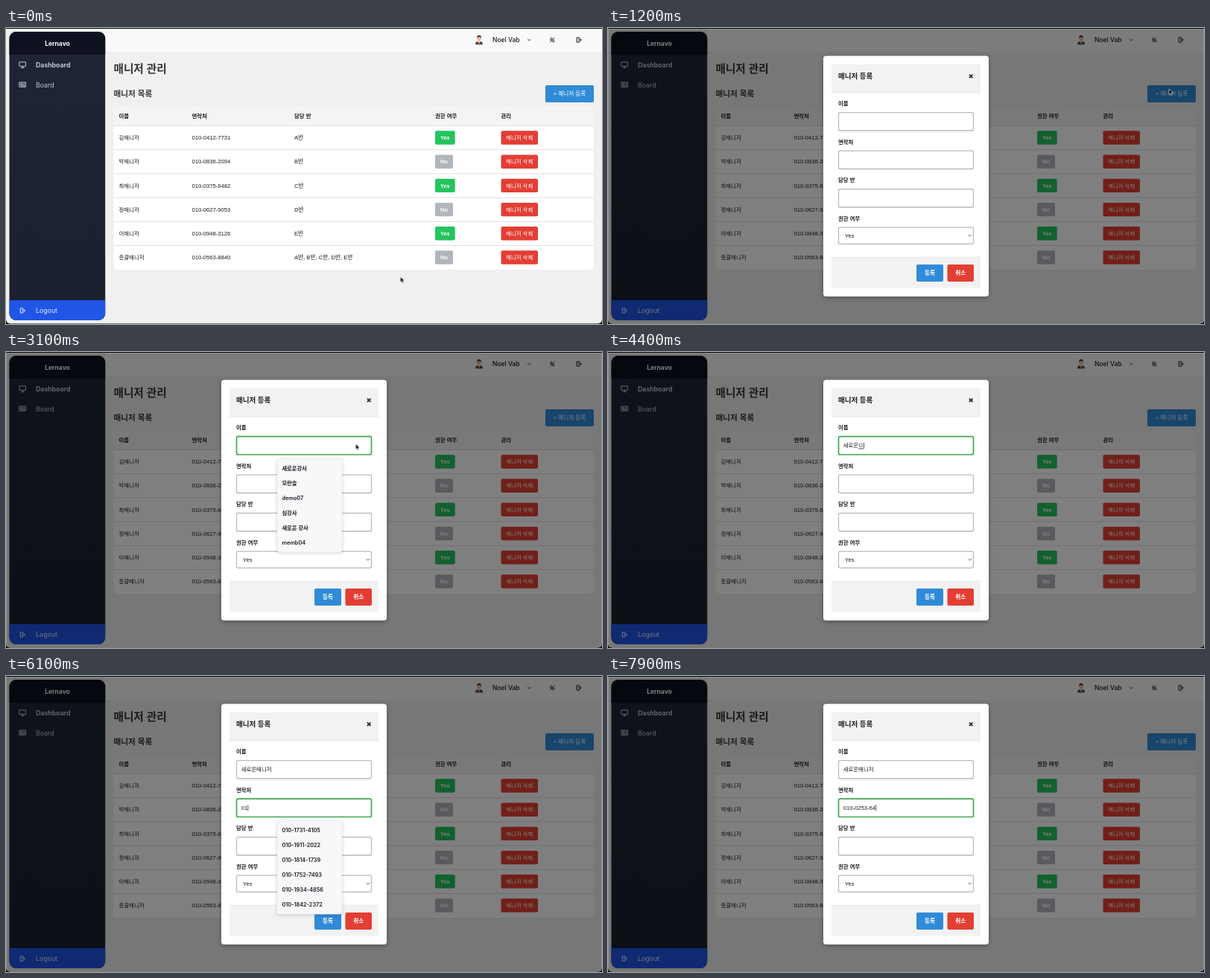
Write an HTML page that moves like this. It is 800x398 px and loops after 8 s.

```html
<!DOCTYPE html>
<html lang="ko">
<head>
<meta charset="utf-8">
<title>매니저 관리</title>
<style>
  html, body { margin: 0; width: 100%; height: 100%; overflow: hidden; background: #000; }
  svg { display: block; width: 800px; height: 398px; }
  text { font: 7.4px "Liberation Sans", "Noto Sans CJK KR", "Noto Sans CJK", sans-serif; fill: #1b1b1f; white-space: pre; }
  .ui { font-family: Inter, "Noto Sans CJK KR", "Noto Sans CJK", sans-serif; font-size: 8.5px; }
  .nav { font-size: 8.8px; }
  .num { font-size: 7.65px; }
  .tip { font-size: 7.3px; font-weight: 600; }
  .b { font-weight: 700; }
  .m { font-weight: 500; }
  .w { fill: #fff; }
  .mid { text-anchor: middle; }
  .line { fill: none; stroke-linecap: round; stroke-linejoin: round; }
  .field { fill: #fff; stroke: #b9b9b9; stroke-width: 1.3; }
  .field.on { stroke: #3fa854; stroke-width: 1.7; }

  #modal { animation: open 8s step-end infinite; }
  #add { animation: hover 8s step-end infinite; }
  #pointer { animation: travel 8s infinite, hide 8s step-end infinite; }
  @keyframes open { 0% { visibility: hidden; } 14.5%, 100% { visibility: visible; } }
  @keyframes hover { 0% { fill: #2f8bd8; } 11.5% { fill: #3f70b0; } 14.5%, 100% { fill: #2f8bd8; } }
  @keyframes hide { 0% { visibility: visible; } 43.5%, 100% { visibility: hidden; } }
  @keyframes travel {
    0%, 2.5% { transform: translate(529.5px, 334.5px); animation-timing-function: ease-in-out; }
    12.5%, 18.5% { transform: translate(753px, 82px); animation-timing-function: ease-in-out; }
    34.5%, 100% { transform: translate(469.5px, 123.5px); }
  }
</style>
</head>
<body>
<svg viewBox="0 0 800 398" xmlns="http://www.w3.org/2000/svg">
  <defs>
    <clipPath id="window"><path id="edge" d="M0 1H800V391Q800 397.5 794 397.5H6Q0 397.5 0 391Z"/></clipPath>
    <clipPath id="side"><rect x="4.5" y="5" width="128.7" height="388" rx="9"/></clipPath>
    <clipPath id="card"><rect x="144.5" y="106" width="644.5" height="219" rx="5"/></clipPath>
    <linearGradient id="navy" x2="0" y2="1">
      <stop stop-color="#1e2536"/><stop offset="1" stop-color="#1a202e"/>
    </linearGradient>
    <filter id="soft" x="-20%" y="-20%" width="140%" height="140%">
      <feDropShadow dx="0" dy="2" stdDeviation="3" flood-opacity=".3"/>
    </filter>
    <filter id="faint" x="-20%" y="-20%" width="140%" height="140%">
      <feDropShadow dx="0" dy="1" stdDeviation="2" flood-opacity=".2"/>
    </filter>
    <path id="exit" class="line" stroke-width="1" d="M.8 -1.8V-3.1H-2.7V3.1H.8V1.8M-.6 0H3.3M2 -1.3L3.3 0L2 1.3"/>
  </defs>

  <g clip-path="url(#window)">
    <rect width="800" height="398" fill="#f0f0f0"/>
    <rect x="133" width="667" height="32" fill="#f9f9fc"/>

    <g clip-path="url(#side)">
      <rect x="4" y="5" width="130" height="388" fill="url(#navy)"/>
      <rect x="4" y="5" width="130" height="31" fill="#0d1120"/>
      <rect x="4" y="366" width="130" height="28" fill="#2055e6"/>
    </g>
    <text class="ui b w mid" x="69" y="23.8">Lernavo</text>
    <text class="ui nav" x="40" y="52.8" style="fill:#d3d8e0;font-weight:600">Dashboard</text>
    <text class="ui nav" x="40" y="79.6" style="fill:#c0c6d0">Board</text>
    <text class="ui nav" x="40" y="383.2" style="fill:#e8eeff">Logout</text>
    <g class="line" stroke="#d3d8e0" stroke-width=".9">
      <path d="M18.2 45.8H26.4V51.4H18.2ZM22.3 51.4V53.4M20.4 53.5H24.2"/>
      <path d="M18.2 73H26.4V79.2H18.2ZM20 74.8H22V76.6H20ZM23.6 74.8H25M23.6 76.6H25M20 78H25"/>
    </g>
    <use href="#exit" x="22" y="380" stroke="#e8eeff"/>

    <g>
      <path d="M630 22.3Q630 18.4 633 18H637Q640 18.4 640 22.3Z" fill="#454b58"/>
      <path d="M633.2 17.5H636.8L635 22.3Z" fill="#fff"/>
      <path d="M634.5 18.8H635.5L636 22.3H634Z" fill="#d8423c"/>
      <ellipse cx="635" cy="14.3" rx="2.5" ry="3.6" fill="#f0bd98"/>
      <path d="M632.2 14Q632 9.8 635 9.8Q638.3 9.8 637.8 14Q637.2 12 635 12Q632.8 12 632.2 14Z" fill="#4a2c24"/>
    </g>
    <text class="ui m" x="653" y="19.3">Noel Vab</text>
    <g class="line" stroke="#222" stroke-width=".95">
      <path d="M700.6 15.3L702.3 16.9L704 15.3"/>
      <path d="M730.4 19.1L736 13M730.3 14.6L731.3 15M732 12.8L732.4 13.8M735.2 17.6L736.3 18M734.2 18.2V19.2"/>
      <path d="M731.2 16.7A2 2 0 0 1 733 14.4M733.3 17.6A2 2 0 0 0 735.2 15.6"/>
    </g>
    <use href="#exit" x="768.8" y="16" stroke="#111"/>

    <text class="b" x="144.5" y="59.5" style="font-size:14.6px;fill:#333">매니저 관리</text>
    <text class="b" x="144.5" y="92.3" style="font-size:10.6px;fill:#333">매니저 목록</text>
    <rect id="add" x="724" y="77" width="65" height="23" rx="2" fill="#2f8bd8"/>
    <text class="m w mid" x="756.5" y="91.2" style="font-size:7.6px">+ 매니저 등록</text>

    <g clip-path="url(#card)">
      <rect x="144" y="106" width="645" height="219" fill="#fff"/>
      <rect x="144" y="106" width="645" height="25.5" fill="#f4f4f4"/>
    </g>
    <g id="table"></g>
  </g>

  <g id="modal">
    <rect y="1" width="800" height="397" fill="#000" fill-opacity=".5" clip-path="url(#window)"/>
    <use href="#edge" fill="none" stroke="#fff" stroke-opacity=".4" clip-path="url(#window)"/>
    <rect x="289" y="37.5" width="222" height="323.5" rx="4" fill="#fff" filter="url(#soft)"/>
    <rect x="300" y="48.5" width="200" height="38.5" fill="#f2f2f2"/>
    <rect x="300" y="308.5" width="200" height="41" fill="#f2f2f2"/>
    <path d="M300 87H500M300 308.3H500" stroke="#e0e0e0" stroke-width=".8"/>
    <text class="b" x="309" y="68" style="font-size:9.5px">매니저 등록</text>
    <path d="M484.9 62.6L489.5 67.2M489.5 62.6L484.9 67.2" stroke="#2b2b2b" stroke-width="1.8"/>
    <g id="form"></g>
    <text class="num" x="318" y="281.9">Yes</text>
    <path class="line" d="M484 278.2L486 280.2L488 278.2" stroke="#555" stroke-width=".9"/>
    <rect x="414" y="318" width="36" height="23" rx="2" fill="#2f8bd8"/>
    <rect x="455.5" y="318" width="35.5" height="23" rx="2" fill="#e33e33"/>
    <text class="b w mid" x="432" y="332.2" style="font-size:7.6px">등록</text>
    <text class="b w mid" x="473.3" y="332.2" style="font-size:7.6px">취소</text>
    <g id="values"></g>
    <g id="tips"></g>
  </g>

  <path id="pointer" d="M0 0V7.4L1.7 5.9L2.9 8.6L4.2 8L3 5.4H5.3Z" fill="#000" stroke="#fff" stroke-width=".6"/>
</svg>

<script>
const NS = 'http://www.w3.org/2000/svg';
const $ = id => document.getElementById(id);

function add(parent, tag, attrs, content = '') {
  const el = document.createElementNS(NS, tag);
  for (const key in attrs) el.setAttribute(key, attrs[key]);
  el.textContent = content;
  return parent.appendChild(el);
}
const label = (parent, x, y, content, cls = '') => add(parent, 'text', { x, y, class: cls }, content);
const box = (parent, x, y, width, height, fill, rx = 2) =>
  add(parent, 'rect', { x, y, width, height, fill, rx });

// Table
const table = $('table');
const columns = [151.5, 249.5, 387, 576, 664.5];
['이름', '연락처', '담당 반', '권한 여부', '관리'].forEach((s, i) => label(table, columns[i], 121.2, s, 'b'));

[
  ['김매니저', '010-0412-7731', 'A반'],
  ['박매니저', '010-0836-2094', 'B반'],
  ['최매니저', '010-0375-6482', 'C반'],
  ['정매니저', '010-0627-9053', 'D반'],
  ['이매니저', '010-0948-3126', 'E반'],
  ['총괄매니저', '010-0563-8840', 'A반, B반, C반, D반, E반']
].forEach((row, i) => {
  const y = 147.5 + i * 32.2;
  add(table, 'path', { d: `M144.5 ${y - 16}H789`, stroke: '#dcdcdc', 'stroke-width': .9 });
  row.forEach((s, c) => label(table, columns[c], y + 2.7, s, c ? 'num' : ''));
  const yes = i % 2 === 0;
  box(table, 576, y - 9.2, yes ? 26.7 : 24, 18.4, yes ? '#25c45f' : '#b1b6bd');
  label(table, yes ? 589.3 : 588, y + 2.7, yes ? 'Yes' : 'No', 'b w mid');
  box(table, 664.5, y - 9.2, 49.5, 18.4, '#e33e33');
  label(table, 689.2, y + 2.7, '매니저 삭제', 'm w mid');
});

// Form
const fields = ['이름', '연락처', '담당 반', '권한 여부'].map((s, i) => {
  const y = 113.6 + i * 51.5;
  label($('form'), 309, y - 9.2, s, 'b');
  return add($('form'), 'rect', { x: 309.5, y, width: 181, height: i < 3 ? 24.4 : 22.2, rx: 2, class: 'field' });
});

const INPUT_X = 315.7;
function makeInput(y, cls) {
  return {
    y,
    text: label($('values'), INPUT_X, y, '', cls),
    line: add($('values'), 'path', { stroke: '#222', 'stroke-width': .8 }),
    caret: add($('values'), 'path', { stroke: '#111', 'stroke-width': .7 })
  };
}
const nameInput = makeInput(128.3, '');
const phoneInput = makeInput(179.8, 'num');

// Suggestions
function makeTip(y, items) {
  const group = add($('tips'), 'g', { filter: 'url(#faint)' });
  const panel = add(group, 'path', { fill: '#f8f7fa', stroke: '#d9d9de', 'stroke-width': .4 });
  const rows = items.map(s => label(group, 370.4, y, s, 'ui tip'));
  return { y, group, panel, rows };
}
const nameTip = makeTip(144, ['새로운강사', '모란솔', 'demo07', '심강사', '새로운 강사', 'memb04']);
const phoneTip = makeTip(195.2, ['010-1731-4105', '010-1911-2022',
  '010-1814-1739', '010-1752-7493', '010-1934-4856', '010-1842-2372']);

// Lists only the entries that begin with the typed value.
function suggest({ y, group, panel, rows }, value, open) {
  let count = 0;
  for (const row of rows) {
    const match = row.textContent.startsWith(value);
    row.style.display = match ? '' : 'none';
    if (match) row.setAttribute('y', y + 14.8 + 20.05 * count++);
  }
  group.style.display = open && count ? '' : 'none';
  const h = 4.7 + 20.05 * count;
  panel.setAttribute('d', `M367 ${y}h5l3.5 -3l3.5 3h69q3 0 3 3v${h - 6}q0 3 -3 3h-81q-3 0 -3 -3v${6 - h}q0 -3 3 -3z`);
}

// Typing
const steps = 'ㅅ 새 샐 새로 새롱 새로우 새로운 새로운ㅁ 새로운매 새로운맨 새로운매니 새로운매닞 새로운매니저'.split(' ');
const phone = '010-0253-64';
const FOCUS = 2880, SUGGEST = 2980, TYPE_NAME = 3480, TAB = 5400, TYPE_PHONE = 5880;

function fill({ text, line, caret, y }, value, composing, focused) {
  text.textContent = value;
  const end = INPUT_X + (value ? text.getComputedTextLength() : 0);
  const from = composing ? text.getStartPositionOfChar(value.length - 1).x : end;
  line.setAttribute('d', composing ? `M${from} ${y + 1.7}H${end}` : '');
  caret.setAttribute('d', focused ? `M${end + .6} ${y - 6.6}V${y + 1.6}` : '');
}

function draw(t) {
  const onName = t >= FOCUS && t < TAB;
  const onPhone = t >= TAB;
  fields[0].classList.toggle('on', onName);
  fields[1].classList.toggle('on', onPhone);

  const step = Math.min(steps.length - 1, Math.floor((t - TYPE_NAME) / 125));
  const name = steps[step] ?? '';
  const typing = step >= 0 && onName;
  fill(nameInput, name, typing, typing);
  suggest(nameTip, name, onName && t >= SUGGEST);

  const count = Math.max(0, Math.floor((t - TYPE_PHONE) / 200) + 1);
  const digits = phone.slice(0, count);
  fill(phoneInput, digits, false, onPhone);
  suggest(phoneTip, digits, count > 0);
}

let start;
function frame(now) {
  start ??= now;
  draw((now - start) % 8000);
  requestAnimationFrame(frame);
}
draw(0);
requestAnimationFrame(frame);
</script>
</body>
</html>
```
